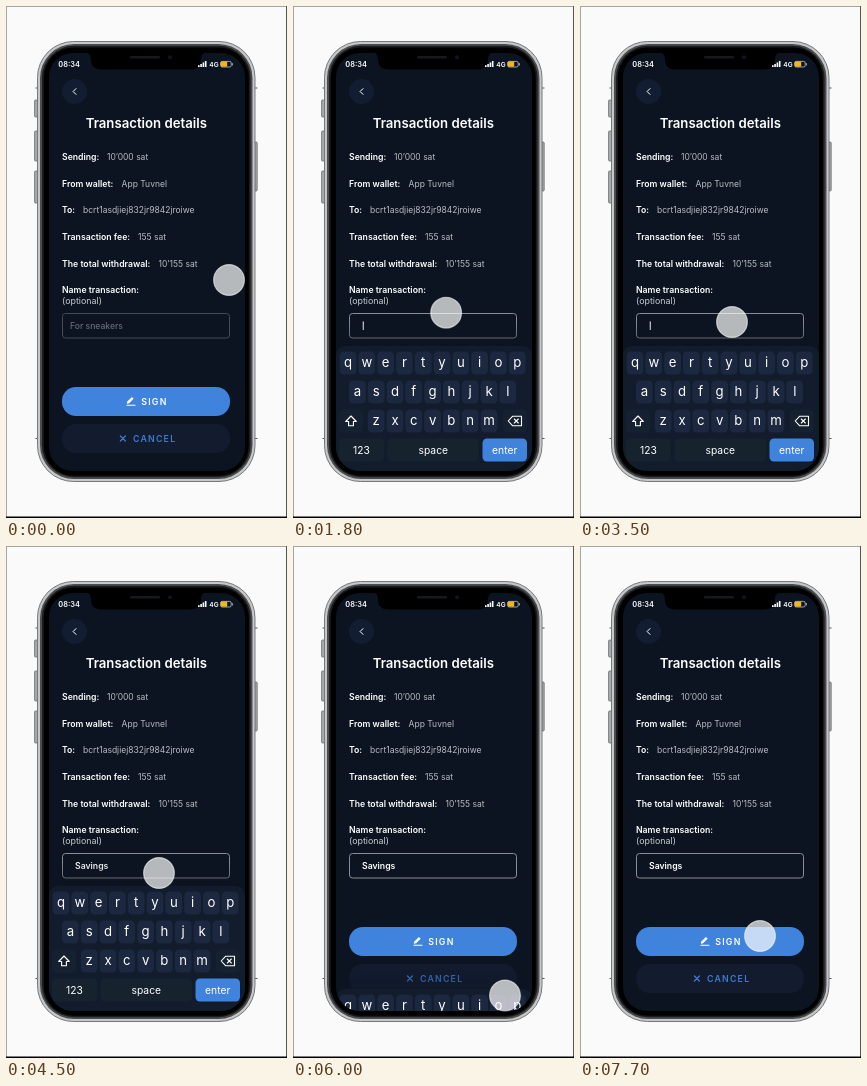
Recreate the animation shown at these times as an HTML page. Size 281 px wide and 512 px high, loop 7800 ms.

```html
<!DOCTYPE html>
<html lang="en">
<head>
<meta charset="utf-8">
<title>Transaction details</title>
<style>
  html, body { margin: 0; width: 100%; height: 100%; overflow: hidden; background: #fafafa; }
  svg { display: block; width: 281px; height: 512px; }
  text { font-family: Inter, "Open Sans", sans-serif; fill: #fff; white-space: pre; }
  .label { font-size: 8.7px; font-weight: 600; }
  .value { font-size: 8.5px; fill: #b9bdc4; }
  .caps { font-size: 8.8px; font-weight: 600; letter-spacing: 1.2px; }
  .key { font-size: 13.2px; text-anchor: middle; }
  .word { font-size: 10.3px; text-anchor: middle; }
  .line { fill: none; stroke: #fff; stroke-linecap: round; stroke-linejoin: round; }
</style>
</head>
<body>
<svg viewBox="0 0 281 512">
  <defs>
    <linearGradient id="shade" x2="0" y2="1">
      <stop offset="0" stop-color="#0b1420" stop-opacity="0"/>
      <stop offset="1" stop-color="#0b1420" stop-opacity=".42"/>
    </linearGradient>
    <clipPath id="glass"><rect x="43" y="47" width="196" height="418" rx="24"/></clipPath>
  </defs>

  <rect width="281" height="512" fill="#fafafa"/>
  <path d="M0 .5H281M.5 0V512" stroke="#a5a5a5" fill="none"/>
  <path d="M280.5 0V512" stroke="#555"/>
  <path d="M0 511.2H281" stroke="#000" stroke-width="1.6"/>

  <!-- phone -->
  <g fill="#a9aaab" stroke="#5a5b5d" stroke-width=".7">
    <rect x="28.6" y="94" width="3" height="17" rx="1"/>
    <rect x="28.6" y="125" width="3" height="30" rx="1"/>
    <rect x="28.6" y="165" width="3" height="32" rx="1"/>
    <rect x="248.8" y="136" width="2.4" height="49" rx="1"/>
  </g>
  <path d="M29.5 432.5h4M247 432.5h4.5M247 82h4.5M29.5 82h4" stroke="#555" stroke-width="1.2"/>
  <rect x="31.5" y="35.5" width="217.5" height="440" rx="36" fill="#c6c7c8" stroke="#77787a"/>
  <rect x="34" y="38" width="212.5" height="435" rx="34" fill="#4b4c4e"/>
  <rect x="36" y="39.8" width="208.6" height="431.4" rx="32" fill="#1b1c1e"/>
  <rect x="37.8" y="41.4" width="205" height="428.4" rx="30" fill="#000"/>

  <g clip-path="url(#glass)">
    <rect x="43" y="47" width="196" height="418" fill="#0b1420"/>
    <g id="details"></g>

    <rect id="idleBox" x="56.5" y="307.5" width="167" height="24.5" rx="3" fill="none" stroke="#454b55"/>
    <rect id="liveBox" x="56.5" y="307.5" width="167" height="24.5" rx="3" fill="none" stroke="#8a8e94"/>
    <text id="hint" x="64" y="323" font-size="8.6" font-weight="500" style="fill:#666b73">For sneakers</text>
    <rect id="caret" x="69.7" y="315.5" width="1.2" height="8.5" fill="#d9dbde"/>
    <text id="typed" x="69" y="322.6" class="label">Savings</text>

    <rect x="56" y="381" width="168" height="29" rx="14" fill="#4083dc"/>
    <path class="line" stroke-width="1.1" d="M121 399.3h8"/>
    <path d="M120.8 397.7l.5-2.2 4.6-4.6 1.8 1.8-4.6 4.5z" fill="#fff"/>
    <text x="135.3" y="398.6" class="caps">SIGN</text>
    <rect x="56" y="418" width="168" height="29" rx="14" fill="#131c2f"/>
    <path class="line" style="stroke:#3e7bd0" stroke-width="1.2" d="M114.4 430l5 5m0-5l-5 5"/>
    <text x="127" y="435.6" class="caps" style="fill:#3e7bd0">CANCEL</text>

    <g id="keyboard"></g>
  </g>

  <!-- notch and status -->
  <path d="M79 46H201Q195 47 195 53Q195 63.5 184.5 63.5H95.5Q85 63.5 85 53Q85 47 79 46z" fill="#000"/>
  <rect x="124" y="50" width="30" height="2.6" rx="1.3" fill="#17191d"/>
  <circle cx="164" cy="51.3" r="2" fill="#10141f"/>
  <text x="52.3" y="61" font-size="7.4" font-weight="600">08:34</text>
  <path d="M192 59.2h1.6v1.8H192zM194.3 58h1.6v3h-1.6zM196.6 56.5h1.6V61h-1.6zM198.9 55h1.6v6h-1.6z" fill="#fff"/>
  <text x="203.3" y="61" font-size="6.6" font-weight="600">4G</text>
  <rect x="214.6" y="55.4" width="10.6" height="5.6" rx="1.6" fill="none" stroke="#c4c6c9" stroke-width=".8"/>
  <rect x="214.8" y="55.6" width="6.4" height="5.2" rx="1" fill="#f3b51d"/>
  <rect x="225.9" y="57" width="1" height="2.4" rx=".5" fill="#a9abae"/>

  <circle id="touch" r="15.4" fill="#fff" fill-opacity=".7" stroke="#fff" stroke-opacity=".55" stroke-width="1.2"/>
</svg>

<script>
const LOOP = 7800, STEP = 100;
const $ = id => document.getElementById(id);
const text = (x, y, cls, s) => `<text x="${x}" y="${y}" class="${cls}">${s}</text>`;
const box = (x, y, w, h, fill) =>
  `<rect x="${x}" y="${y}" width="${w}" height="${h}" rx="4.5" fill="${fill}"/>`;

const rows = [
  ["Sending:", 153.8, 101, "10’000 sat"],
  ["From wallet:", 180.7, 115.6, "App Tuvnel"],
  ["To:", 207.3, 77, "bcrt1asdjiej832jr9842jroiwe"],
  ["Transaction fee:", 234, 132, "155 sat"],
  ["The total withdrawal:", 260.8, 152.5, "10’155 sat"],
  ["Name transaction:", 287.2, 56, ""]
];
$("details").innerHTML =
  `<circle cx="68.5" cy="85.5" r="12.5" fill="#131d31"/>
   <path class="line" d="M70 82.6l-2.9 2.9 2.9 2.9"/>
   <text x="140.3" y="121.7" font-size="13.2" font-weight="600" text-anchor="middle">Transaction details</text>` +
  rows.map(([name, y, x, value]) => text(56, y, "label", name) + text(x, y, "value", value)).join("") +
  `<text x="56" y="298" font-size="8.9" style="fill:#c9ccd1">(optional)</text>`;

function letterRow(letters, x, y) {
  return [...letters].map((c, i) => {
    const cx = x + i * 18.8;
    return box(cx - 8.4, y - 11.5, 16.8, 23, "#1c2740") + text(cx, y + 4.4, "key", c);
  }).join("");
}
$("keyboard").innerHTML =
  `<rect x="43" y="314" width="196" height="26" fill="url(#shade)"/>
   <rect x="43" y="340" width="196" height="140" rx="9" fill="#131c2c"/>` +
  letterRow("qwertyuiop", 55, 357) +
  letterRow("asdfghjkl", 64.4, 386) +
  letterRow("zxcvbnm", 83.2, 415) +
  box(46, 403.5, 24, 23, "#152031") + box(210, 403.5, 24, 23, "#152031") +
  `<path class="line" stroke-width="1.1" d="M58 410l5.3 5.5h-2.9v4.3h-4.8v-4.3h-2.9z"/>
   <path class="line" stroke-width="1.1" d="M219.5 410.3h9v9.4h-9l-4.3-4.7zM221.3 413l4 4m0-4l-4 4"/>` +
  box(46, 432.5, 45, 23, "#17222f") + box(94.5, 432.5, 91.5, 23, "#17222f") +
  box(189.5, 432.5, 44.5, 23, "#4083dc") +
  text(68.5, 447.6, "word", "123") + text(140.3, 447.6, "word", "space") + text(211.7, 447.6, "word", "enter");

// time, x, y
const path = [
  [0, 223, 274], [700, 168, 318], [1100, 168, 318], [2000, 151, 305], [3000, 151, 305],
  [4000, 153, 327], [4500, 153, 327], [5300, 212, 450], [6600, 212, 449],
  [7500, 180, 390], [LOOP, 180, 390]
];
const mix = (a, b, k) => a + (b - a) * k;
const smooth = k => k * k * (3 - 2 * k);
const easeOut = k => 1 - Math.pow(1 - k, 1.55);
const ramp = (t, start) => easeOut(Math.min(1, Math.max(0, (t - start) / 300)));

function touchAt(t) {
  const i = path.findIndex(p => p[0] > t);
  const [t0, x0, y0] = path[i - 1], [t1, x1, y1] = path[i];
  const k = smooth((t - t0) / (t1 - t0));
  return [mix(x0, x1, k), mix(y0, y1, k)];
}

function draw(t) {
  const focus = ramp(t, 800), fill = ramp(t, 3500), close = ramp(t, 5800);
  const [x, y] = touchAt(t);
  const blink = t >= 1900 && t < 2600 ? 0 : 1;
  $("touch").setAttribute("cx", x);
  $("touch").setAttribute("cy", y);
  const drop = 1 - focus + close;
  $("keyboard").setAttribute("transform", `translate(0 ${126 * drop})`);
  $("keyboard").setAttribute("visibility", drop < 1 ? "visible" : "hidden");
  $("idleBox").setAttribute("opacity", 1 - focus);
  $("liveBox").setAttribute("opacity", focus);
  $("hint").setAttribute("opacity", 1 - focus);
  $("caret").setAttribute("opacity", focus * blink * (1 - fill));
  $("typed").setAttribute("opacity", fill);
}

const start = performance.now();
function tick() {
  const t = (performance.now() - start) % LOOP;
  draw(Math.floor(t / STEP) * STEP);
  requestAnimationFrame(tick);
}
draw(0);
requestAnimationFrame(tick);
</script>
</body>
</html>
```
